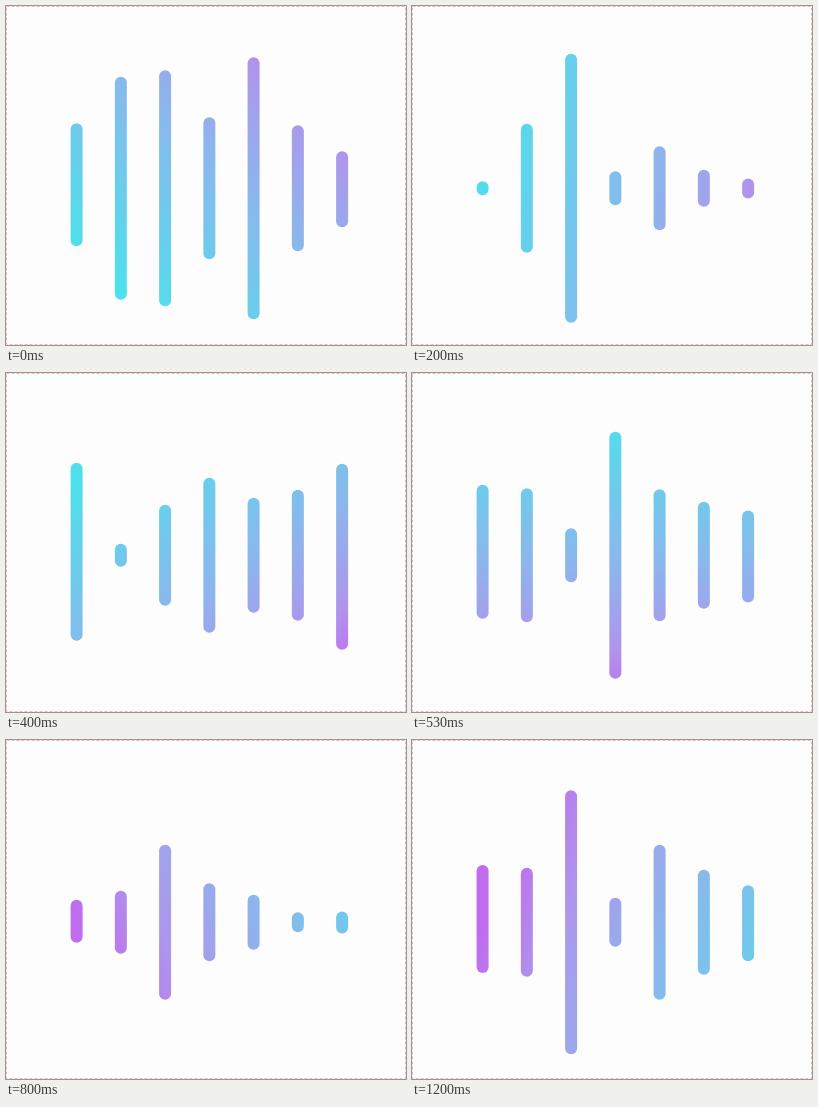
Animation, 400 px wide and 339 px high, one loop 1.27 s. Source, as an HTML page with a canvas:

```html
<!DOCTYPE html>
<html lang="en">
<head>
<meta charset="utf-8">
<title>Sound wave</title>
<style>
  html, body { margin: 0; width: 100%; height: 100%; overflow: hidden; background: #fefdfe; }
  canvas { display: block; width: 400px; height: 339px; }
</style>
</head>
<body>
<canvas id="stage" width="400" height="339"></canvas>
<script>
const ctx = document.getElementById('stage').getContext('2d');
const W = 400, H = 339;
const LOOP = 1270, STEP = 200 / 3, LAST_STEP = 18;
const CENTER = { x: 203.3, y: 182.3 };
const BAR = { first: 70.6, gap: 44.25, width: 12 };

// Half heights of the bars at these steps
const barSteps = [0, 2, 3, 6, 8, 12, 15, 17, 18];
const bars = [
  { shift: -3.5, half: [61.5, 15, 7, 89, 67, 21.5, 65.5, 58, 54] },
  { shift: 0, half: [111.5, 80, 64.5, 11.5, 67, 31.5, 18.5, 42, 54.5] },
  { shift: 0, half: [118, 139, 134.5, 50.5, 27, 77.5, 81, 135, 132] },
  { shift: 0, half: [71, 28, 17, 77.5, 123.5, 39, 27, 24, 24.5] },
  { shift: 0, half: [131, 70, 42, 57.5, 66, 27.5, 44.5, 66, 77.5] },
  { shift: 0, half: [63, 27, 18.5, 65.5, 53.5, 10, 34, 48, 52.5] },
  { shift: 1.5, half: [38, 15, 10, 93, 46, 11, 34.5, 39, 38] }
];

// Turning gradient: its value at the center and its slope per 1000 px
const toneSteps = [0, 3, 6, 8, 12, 15, 18];
const tone = {
  mid: [.43, .42, .43, .49, .66, .67, .66],
  x: [2.2, 2.9, 1.7, -.1, -2.6, -2.6, -2.6],
  y: [-2.3, .7, 2.8, 3.4, 1.2, 0, -1]
};
const stops = [[0, '#4ee0ec'], [.5, '#8ab8ec'], [.8, '#ae96ec'], [1, '#c06cee']];

// Smooth curve through the points that does not overshoot
function curve(xs, ys, x) {
  const slope = i => (ys[i + 1] - ys[i]) / (xs[i + 1] - xs[i]);
  const tangent = i => {
    if (i === 0) return slope(0);
    if (i === xs.length - 1) return slope(i - 1);
    const a = slope(i - 1), b = slope(i);
    return a * b > 0 ? 2 * a * b / (a + b) : 0;
  };
  let i = 0;
  while (i < xs.length - 2 && x >= xs[i + 1]) i++;
  const d = xs[i + 1] - xs[i], u = (x - xs[i]) / d, v = 1 - u;
  return ys[i] * (1 + 2 * u) * v * v + ys[i + 1] * u * u * (3 - 2 * u)
    + d * u * v * (tangent(i) * v - tangent(i + 1) * u);
}

function gradientAt(step) {
  const mid = curve(toneSteps, tone.mid, step);
  const gx = curve(toneSteps, tone.x, step) / 1000;
  const gy = curve(toneSteps, tone.y, step) / 1000;
  const scale = 1 / (gx * gx + gy * gy);
  const point = t => [CENTER.x + gx * (t - mid) * scale, CENTER.y + gy * (t - mid) * scale];
  const gradient = ctx.createLinearGradient(...point(0), ...point(1));
  stops.forEach(([at, color]) => gradient.addColorStop(at, color));
  return gradient;
}

function drawBorder() {
  ctx.lineWidth = 1;
  ctx.strokeStyle = '#f0b4c4';
  ctx.lineCap = 'butt';
  ctx.setLineDash([3, 2]);
  ctx.strokeRect(.5, .5, W - 1, H - 1);
  ctx.setLineDash([]);
}

function draw(step) {
  ctx.fillStyle = '#fefdfe';
  ctx.fillRect(0, 0, W, H);
  drawBorder();
  ctx.strokeStyle = gradientAt(step);
  ctx.lineWidth = BAR.width;
  ctx.lineCap = 'round';
  bars.forEach(({ shift, half }, i) => {
    const h = curve(barSteps, half, step);
    const reach = Math.max(.1, h - BAR.width / 2);
    const x = BAR.first + i * BAR.gap;
    const y = CENTER.y + shift * Math.min(1, reach / 50);
    ctx.beginPath();
    ctx.moveTo(x, y - reach);
    ctx.lineTo(x, y + reach);
    ctx.stroke();
  });
}

const start = performance.now();
function tick() {
  const time = (performance.now() - start) % LOOP;
  draw(Math.min(LAST_STEP, Math.floor((time + 4) / STEP)));
  requestAnimationFrame(tick);
}
tick();
</script>
</body>
</html>
```
